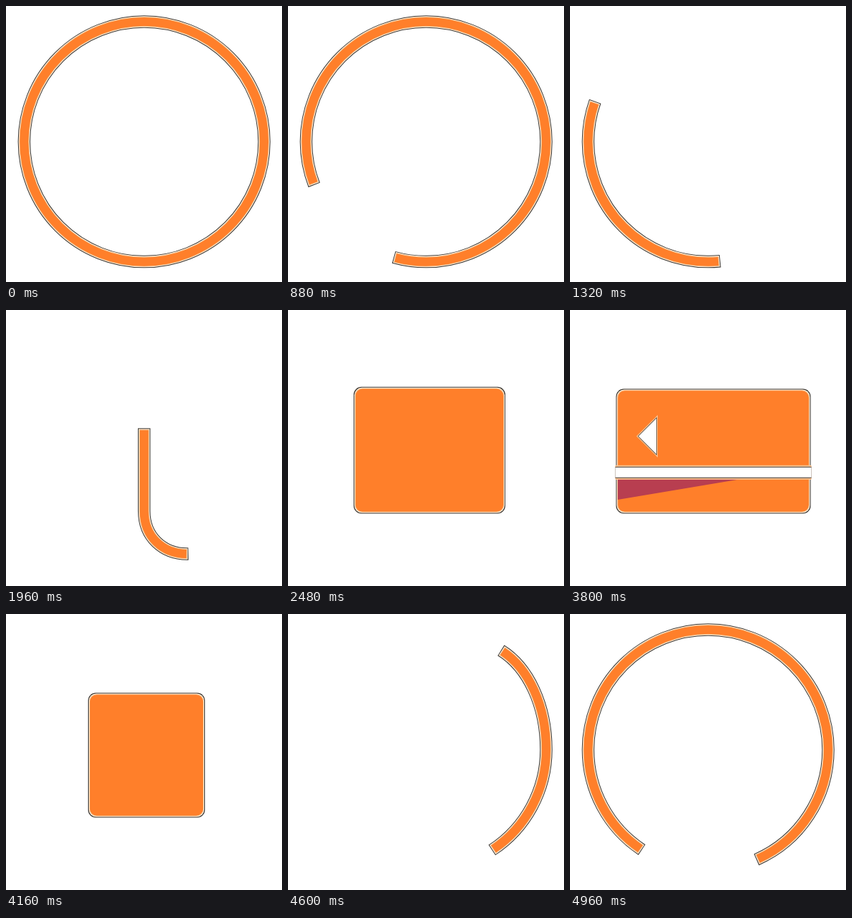
Write an HTML page with a canvas that moves like this. It is 387 by 387 pixels and loops after 5000 ms.

```html
<!DOCTYPE html>
<html lang="en">
<head>
<meta charset="utf-8">
<title>Ring to card</title>
<style>
  html, body { margin: 0; width: 100%; height: 100%; overflow: hidden; background: #fff; }
  canvas { display: block; }
</style>
</head>
<body>
<canvas id="stage" width="387" height="387"></canvas>
<script>
const ctx = document.getElementById('stage').getContext('2d');
const LOOP = 5000, STEP = 40;
const CX = 193.7, CY = 190.3, R = 168.3, TURN = Math.PI * 2;
const ORANGE = '#ff7f2a', SHADE = '#b83e50', EDGE = '#3a352f';
// Nested layers from the thin dark rim to the solid fill: colour, inset
const LAYERS = [[EDGE, 0], ['#fff4e6', 1], ['#ffc592', 1.8], [ORANGE, 2.7]];

// One continuous track: ring laps, into the centre line, back out to the ring
const track = new Path2D();
track.arc(CX, CY, R, TURN / 4, TURN * 1.25);
track.arc(CX, CY, R, TURN / 4, TURN);
track.bezierCurveTo(CX + R, 275, 315, 342, 254, 342);
track.bezierCurveTo(220, 342, CX, 318, CX, 282);
track.lineTo(CX, 98);
track.bezierCurveTo(CX, 62, 220, 38, 254, 38);
track.bezierCurveTo(315, 38, CX + R, 105, CX + R, CY);
track.arc(CX, CY, R, 0, TURN);
track.arc(CX, CY, R, 0, TURN);

// Keys are [time, value]; distances along the track are in pixels
const HEAD = [[640, R * TURN], [1320, 1376], [1720, 2010], [1960, 2264], [2200, 2325],
              [4280, 2325], [4600, 2800], [4880, 3560], [4960, 3885], [5000, 4069]];
const TAIL = [[640, 0], [1320, 1043], [1720, 1830], [1960, 2057], [2200, 2151],
              [4280, 2151], [4600, 2480], [4880, 2890], [4960, 3002], [5000, 3010]];
const LEFT = [[2280, 185], [2600, 49], [2840, 62], [3080, 64.5],
              [3880, 64.5], [4160, 115], [4300, 185]];
const RIGHT = [[2280, 202.5], [2600, 352], [2840, 340.5], [3080, 337.5],
               [3880, 337.5], [4160, 279], [4300, 202.5]];
const TOP = [[2280, 108], [2840, 107.5], [3080, 110.5], [4160, 110.5], [4300, 108]];
const STRIPE = [[2600, 0], [2840, 124], [2960, 150], [3800, 150], [4080, 0]];
const DETAIL = [[2880, 0], [3120, 1], [3800, 1], [4000, 0]];

// Smooth curve through the keys, flat at turning points and ends
function at(keys, t) {
  const last = keys.length - 1;
  if (t <= keys[0][0]) return keys[0][1];
  if (t >= keys[last][0]) return keys[last][1];
  const i = keys.findIndex(k => k[0] > t) - 1;
  const slope = j => {
    if (j < 1 || j >= last) return 0;
    const [a, b, c] = keys.slice(j - 1, j + 2);
    return (b[1] - a[1]) * (c[1] - b[1]) <= 0 ? 0 : (c[1] - a[1]) / (c[0] - a[0]);
  };
  const [t0, v0] = keys[i], [t1, v1] = keys[i + 1];
  const d = t1 - t0, s = (t - t0) / d, s2 = s * s, s3 = s2 * s;
  return v0 + (v1 - v0) * (3 * s2 - 2 * s3)
    + d * (slope(i) * (s3 - 2 * s2 + s) + slope(i + 1) * (s3 - s2));
}

function drawStroke(tail, head) {
  for (const [color, inset] of LAYERS) {
    const extra = 3 - inset;
    ctx.strokeStyle = color;
    ctx.lineWidth = 17.5 - 2 * inset;
    ctx.setLineDash([head - tail + 2 * extra, 1e5]);
    ctx.lineDashOffset = extra - tail;
    ctx.stroke(track);
  }
  ctx.setLineDash([]);
}

function box(x0, y0, x1, y1, radius, color) {
  ctx.fillStyle = color;
  ctx.beginPath();
  ctx.roundRect(x0, y0, x1 - x0, y1 - y0, radius);
  ctx.fill();
}

function polygon(...points) {
  ctx.beginPath();
  points.forEach(p => ctx.lineTo(...p));
  ctx.closePath();
}

function drawArrow(size) {
  const h = 25 * size, x = 108.5;
  polygon([x - h / 2, 177], [x + h / 2, 177 - h], [x + h / 2, 177 + h]);
  for (const [color, width] of [['#ffc592', 4], [EDGE, 1.4]]) {
    ctx.strokeStyle = color;
    ctx.lineWidth = width;
    ctx.stroke();
  }
  ctx.fillStyle = '#fff';
  ctx.fill();
}

function drawCard(t) {
  const x0 = at(LEFT, t), x1 = at(RIGHT, t), y0 = at(TOP, t), y1 = 285.5;
  const radius = Math.min(11, (x1 - x0 - 17) / 8);
  ctx.save();
  for (const [color, inset] of LAYERS)
    box(x0 + inset, y0 + inset, x1 - inset, y1 - inset, Math.max(0, radius - inset / 2), color);
  ctx.beginPath();
  ctx.rect(x0 - 1, y0 - 1, x1 - x0 + 2, y1 - y0 + 2);
  ctx.clip();

  const detail = at(DETAIL, t);
  if (detail > 0.01) {
    ctx.fillStyle = SHADE;
    polygon([67, 237], [67 + 173 * detail, 237], [67, 237 + 29 * detail]);
    ctx.fill();
    drawArrow(detail);
  }
  const half = at(STRIPE, t), mid = 199.5;
  if (half > 1) {
    [['#ffc592', -2], [EDGE, 0], ['#fff', 1]].forEach(([color, inset]) =>
      box(mid - half + inset, 219.8 + inset, mid + half - inset, 235.8 - inset, 2, color));
  }
  ctx.restore();
}

function render(now) {
  const t = Math.floor((now % LOOP) / STEP) * STEP;
  ctx.fillStyle = '#fff';
  ctx.fillRect(0, 0, 387, 387);
  if (t > 2280 && t < 4300) drawCard(t);
  else drawStroke(at(TAIL, t), at(HEAD, t));
}

let start;
function tick(now) {
  start ??= now;
  render(now - start);
  requestAnimationFrame(tick);
}
requestAnimationFrame(tick);
</script>
</body>
</html>
```
